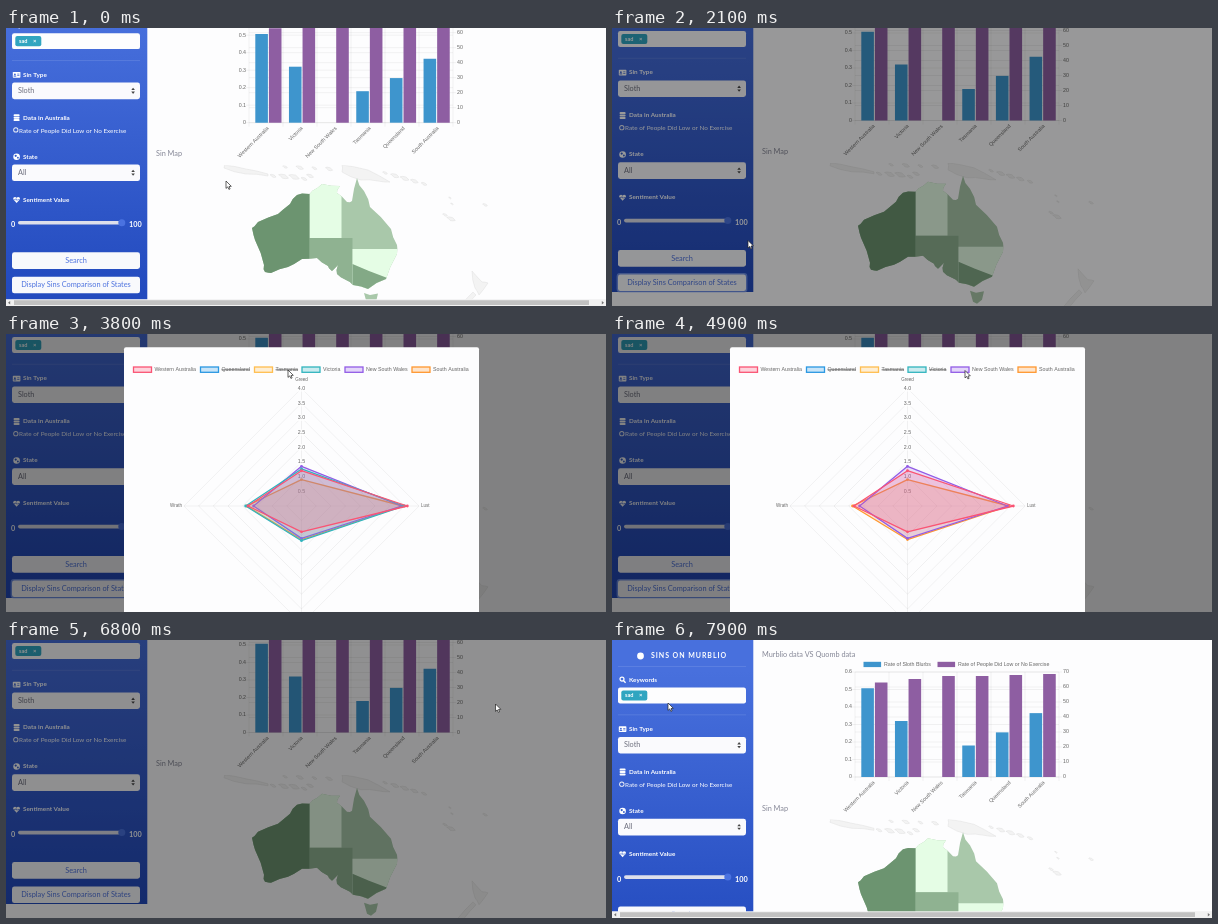
Write an HTML page with a canvas that moves like this. It is 600x278 px and loops after 8 s.

```html
<!DOCTYPE html>
<html lang="en">
<head>
<meta charset="utf-8">
<title>Sins dashboard</title>
<style>
html, body { margin: 0; width: 100%; height: 100%; overflow: hidden; background: #fdfdfe; }
canvas { display: block; width: 600px; height: 278px; }
</style>
</head>
<body>
<canvas id="stage"></canvas>
<script>
const W = 600, H = 278, LOOP = 8000, STEP = 100;
const canvas = document.getElementById('stage');
const dpr = window.devicePixelRatio || 1;
canvas.width = W * dpr;
canvas.height = H * dpr;
const c = canvas.getContext('2d');

const UI = 'Lato, "Open Sans", sans-serif';
const CHART = '"Liberation Sans", Arial, sans-serif';
const GRID = 'rgba(0,0,0,.1)';

const SCROLL = [[0, 42.3], [200, 44.5], [7350, 44.5], [7750, 0]];
const SHADE = [[1800, 0], [2100, 0.4], [2300, 0.49], [6600, 0.49], [6800, 0.43], [7000, 0]];
const POINTER = [
  [0, 220, 153], [900, 160, 220], [1500, 104, 254], [1850, 102, 255], [2100, 136, 212.5],
  [2700, 288, 158.5], [3000, 232, 36], [3800, 282, 36], [4400, 326, 36], [4800, 353, 36.5],
  [5200, 353, 36.5], [6100, 488.5, 48.5], [6800, 489.5, 64], [7100, 480, 66], [7900, 56, 63]
];

const clamp = x => Math.max(0, Math.min(1, x));
const ramp = (t, a, b) => clamp((t - a) / (b - a));
const smooth = x => x * x * (3 - 2 * x);

function track(keys, t, col = 1) {
  if (t <= keys[0][0]) return keys[0][col];
  for (let i = 1; i < keys.length; i++) {
    const a = keys[i - 1], b = keys[i];
    if (t <= b[0]) return a[col] + (b[col] - a[col]) * smooth(ramp(t, a[0], b[0]));
  }
  return keys[keys.length - 1][col];
}

function seeded(s) {
  return () => (s = (s * 16807) % 2147483647) / 2147483647;
}

function rect(x, y, w, h, fill, r = 0) {
  c.fillStyle = fill;
  c.beginPath();
  c.roundRect(x, y, w, h, r);
  c.fill();
}

function line(x1, y1, x2, y2, color, w = 0.5) {
  c.strokeStyle = color;
  c.lineWidth = w;
  c.beginPath();
  c.moveTo(x1, y1);
  c.lineTo(x2, y2);
  c.stroke();
}

function dot(x, y, r, fill) {
  c.fillStyle = fill;
  c.beginPath();
  c.arc(x, y, r, 0, 7);
  c.fill();
}

function text(s, x, y, size, color, { font = UI, weight = 400, align = 'left', space = 0 } = {}) {
  c.font = `${weight} ${size}px ${font}`;
  c.letterSpacing = space + 'px';
  c.textAlign = align;
  c.textBaseline = 'middle';
  c.fillStyle = color;
  c.fillText(s, x, y);
  const w = c.measureText(s).width;
  c.letterSpacing = '0px';
  return w;
}

const label = (s, x, y, align = 'left', size = 5.27) => text(s, x, y, size, '#666', { font: CHART, align });

function trace(pts) {
  c.beginPath();
  for (let i = 0; i < pts.length; i += 2) c.lineTo(pts[i], pts[i + 1]);
  c.closePath();
}

function shape(pts, fill, stroke, w = 0.5) {
  trace(pts);
  if (fill) { c.fillStyle = fill; c.fill(); }
  if (stroke) { c.strokeStyle = stroke; c.lineWidth = w; c.stroke(); }
}

/* sidebar */
const ICONS = {
  search(x, y) {
    c.strokeStyle = '#fff';
    c.lineWidth = 1.2;
    c.beginPath();
    c.arc(x - 0.6, y - 0.6, 2, 0, 7);
    c.stroke();
    line(x + 1, y + 1, x + 3, y + 3, '#fff', 1.3);
  },
  card(x, y) {
    rect(x - 3.8, y - 2.8, 7.6, 5.8, '#fff', 0.7);
    dot(x - 1.7, y - 0.3, 0.9, '#3c64d2');
    rect(x - 3, y + 0.9, 2.6, 1, '#3c64d2');
    for (const d of [-1, 0.6]) rect(x + 0.6, y + d, 2.2, 0.7, '#3c64d2');
  },
  data(x, y) {
    for (const d of [-2.4, 0, 2.4]) rect(x - 3, y + d - 1, 6, 2, '#fff', 0.9);
  },
  globe(x, y) {
    dot(x, y, 3.3, '#fff');
    dot(x - 0.9, y - 0.9, 1.1, '#3059c8');
    dot(x + 1.3, y + 1, 0.9, '#3059c8');
  },
  heart(x, y) {
    for (const d of [-1.6, 1.6]) dot(x + d, y - 1, 1.8, '#fff');
    shape([x - 3.3, y - 0.4, x + 3.3, y - 0.4, x, y + 3.3], '#fff');
    line(x - 3.4, y, x - 0.8, y, '#2b54c4', 0.6);
    line(x - 0.8, y - 1.2, x + 0.6, y + 1.2, '#2b54c4', 0.6);
    line(x + 0.8, y, x + 3.4, y, '#2b54c4', 0.6);
  }
};

function heading(icon, s, y) {
  ICONS[icon](10.6, y);
  text(s, 17, y, 6.35, '#fff', { weight: 700 });
}

function select(s, y) {
  rect(6, y, 128, 16.6, '#fafafd', 2.4);
  text(s, 12, y + 8.2, 7.3, '#6e707e');
  for (const d of [-1, 1]) {
    const m = y + 8.25 + d * 0.75;
    shape([125.3, m, 128.9, m, 127.1, m + d * 2.3], '#444');
  }
}

function button(s, y, focus) {
  if (focus) rect(4.6, y - 1.4, 130.8, 19.4, 'rgba(150,178,250,.65)', 3.4);
  rect(6, y, 128, 16.6, '#f8f9fc', 2.4);
  text(s, 70, y + 8.3, 7.37, '#4e73df', { align: 'center' });
}

function sidebar(t) {
  const g = c.createLinearGradient(0, 0, 0, 308.5);
  g.addColorStop(0.1, '#4870dd');
  g.addColorStop(1, '#224abe');
  rect(0, 0, 141.3, t < 100 ? 314 : 308.5, g);

  dot(28.5, 16, 3.4, '#fff');
  text('SINS ON MURBLIO', 39, 16, 7, '#fff', { weight: 700, space: 0.95 });
  for (const y of [26.5, 74.8]) line(6, y, 134, y, 'rgba(255,255,255,.18)', 0.6);

  heading('search', 'Keywords', 39.7);
  rect(6, 47.6, 128, 15.8, '#fdfdfe', 2.2);
  rect(9.3, 50.4, 26, 10.2, '#30a5c0', 2);
  text('sad', 13, 55.4, 5.6, '#fff', { weight: 700 });
  text('×', 27, 55.3, 6, '#fff', { weight: 700 });

  heading('card', 'Sin Type', 89);
  select('Sloth', 96.9);
  heading('data', 'Data in Australia', 132);
  dot(9.8, 144.2, 2.6, '#eef0f6');
  dot(9.8, 144.2, 1.7, '#3b62ce');
  text('Rate of People Did Low or No Exercise', 13, 145, 6.35, '#fff');
  heading('globe', 'State', 171);
  select('All', 178.8);
  heading('heart', 'Sentiment Value', 214);

  text('0', 5, 239.3, 7.3, '#fff', { weight: 700 });
  rect(12, 235.3, 105.5, 3.6, '#dddfeb', 1.8);
  dot(115.8, 237.1, 3.5, '#4a72e0');
  text('100', 123, 239.3, 7.3, '#fff', { weight: 700 });

  button('Search', 266.6, false);
  button('Display Sins Comparison of States', 291, t >= 1800 && t < 6500);
}

/* bar chart: state, sloth rate, low exercise rate */
const RATES = [
  ['Western Australia', 0.507, 63], ['Victoria', 0.32, 65.3], ['New South Wales', 0, 67.3],
  ['Tasmania', 0.18, 67.3], ['Queensland', 0.255, 68], ['South Australia', 0.365, 68.7]
];

function bars() {
  const L = 243, R = 447, top = 32, base = 137, h = base - top, step = (R - L) / 6;
  text('Murblio data VS Quomb data', 150, 14.7, 7.3, '#858796');
  rect(251.5, 21.8, 17.6, 5.3, '#3e95cd');
  label('Rate of Sloth Blurbs', 272, 24.6);
  rect(325.5, 21.8, 17.6, 5.3, '#8e5ea2');
  label('Rate of People Did Low or No Exercise', 346, 24.6);

  for (let i = 0; i <= 6; i++) {
    const y = base - h * i / 6, x = L + step * i;
    line(L - 3, y, R, y, GRID);
    line(x, top, x, base + 4, GRID);
    label(i ? (i / 10).toFixed(1) : '0', L - 3, y, 'right');
  }
  for (let i = 0; i <= 7; i++) {
    const y = base - h * i / 7;
    line(L, y, R + 3, y, GRID);
    label(String(i * 10), R + 4, y);
  }
  RATES.forEach(([name, sloth, lazy], i) => {
    const x = 249.3 + i * 33.65, a = h * sloth / 0.6, b = h * lazy / 70;
    rect(x, base - a, 12.6, a, '#3e95cd');
    rect(x + 13.6, base - b, 12.6, b, '#8e5ea2');
    c.save();
    c.translate(L + step * (i + 0.5) + 2, base + 5);
    c.rotate(-Math.PI / 4);
    label(name, 0, 0, 'right');
    c.restore();
  });
}

/* map */
const COAST = [
  303.5, 166, 291, 167, 284, 176, 272, 186, 252, 194, 246, 200, 249, 212, 258, 237, 259, 244, 265, 245,
  282, 239, 296, 231, 311, 230, 322, 238, 326, 243, 332, 237, 331, 246, 340, 252, 347, 257, 362, 261,
  380, 251, 391, 226, 391, 217, 385, 201, 364, 179, 358, 163, 351, 150, 346, 173, 341, 174,
  331, 165, 334, 158, 316, 156, 306, 163
];

// Splits every edge and nudges the middle, for a ragged shore
function ragged(pts, amp, seed) {
  const rnd = seeded(seed), out = [], n = pts.length;
  for (let i = 0; i < n; i += 2) {
    const x = pts[i], y = pts[i + 1], u = pts[(i + 2) % n], v = pts[(i + 3) % n];
    out.push(x, y, (x + u) / 2 + (rnd() - 0.5) * amp, (y + v) / 2 + (rnd() - 0.5) * amp);
  }
  return out;
}
const SHORE = ragged(COAST, 2.4, 77);

const isle = pts => shape(ragged(pts, 1.5, 31), '#f3f3f3', '#dedede');

// A row of small islands from one point to another
function chain(x1, y1, x2, y2, n, size, seed) {
  const rnd = seeded(seed);
  for (let i = 0; i < n; i++) {
    const k = n > 1 ? i / (n - 1) : 0, x = x1 + (x2 - x1) * k, y = y1 + (y2 - y1) * k;
    const w = size * (0.6 + rnd() * 0.6), d = w * 0.35;
    isle([x - w, y - d, x + w * 0.3, y - d, x + w, y + d, x - w * 0.2, y + d]);
  }
}

function australia() {
  c.save();
  trace(SHORE);
  c.clip();
  rect(240, 145, 160, 120, '#a9c8aa');
  rect(303.5, 145, 32, 65, '#e5fde5');
  rect(303.5, 210, 43, 55, '#8fb291');
  rect(240, 145, 63.5, 120, '#6c9470');
  rect(346.5, 221, 50, 45, '#e5fde5');
  shape([346.5, 236, 363, 243, 384, 251, 384, 266, 346.5, 266], '#83a986');
  c.restore();
}

function map() {
  text('Sin Map', 150, 168.5, 7.3, '#858796');
  c.save();
  c.beginPath();
  c.rect(217, 179.5, 270, 160);
  c.clip();
  c.translate(0, 42.3);
  isle([218, 137, 240, 141, 262, 146, 262, 148, 240, 146, 218, 140]);
  isle([336, 137, 362, 142, 384, 154, 372, 153, 355, 152, 336, 144]);
  chain(267, 148, 288, 149, 3, 5, 5);
  chain(298, 151, 304, 148, 2, 5, 9);
  chain(279, 139, 323, 141, 4, 4, 12);
  chain(379, 145, 418, 156, 5, 4, 21);
  chain(444, 170, 446, 176, 2, 2, 8);
  chain(439, 187, 445, 191, 2, 4, 6);
  chain(479, 177, 479, 177, 1, 4, 4);
  isle([466, 243, 476, 254, 482, 255, 473, 267, 469, 260]);
  isle([467, 264, 470, 267, 457, 282, 449, 284]);
  australia();
  shape([358, 265, 364, 267, 372, 265.5, 370, 274, 365, 278, 361, 276], '#a9c8aa');
  c.restore();
}

function scrollbar() {
  rect(0, 271.3, W, 6.7, '#f1f1f1');
  rect(8, 272.2, 575, 4.9, '#c1c1c1');
  shape([2, 274.7, 4.2, 273, 4.2, 276.4], '#777');
  shape([598, 274.7, 595.8, 273, 595.8, 276.4], '#777');
}

/* radar dialog */
const series = (name, x, rgb, off, ...v) => ({ name, x, rgb, off, v });
const SERIES = [
  series('Western Australia', 127.5, '250,84,116', Infinity, 1.2, 3.6, 0.88, 1.82),
  series('Queensland', 194.5, '42,152,226', 3100, 1.34, 3.62, 1.02, 2.1),
  series('Tasmania', 248.5, '255,190,80', 3800, 0.9, 3.55, 1.65, 1.64),
  series('Victoria', 296, '50,180,190', 4400, 1.26, 3.5, 1.18, 1.9),
  series('New South Wales', 339, '146,92,230', 5000, 1.35, 3.4, 1.1, 1.63),
  series('South Australia', 406, '255,152,48', Infinity, 0.9, 3.45, 1.14, 1.87)
];

function radar(t) {
  const X = 295.5, Y = 172, unit = 29.4, reach = 4 * unit;
  const diamond = v => [X, Y - v[0] * unit, X + v[1] * unit, Y, X, Y + v[2] * unit, X - v[3] * unit, Y];

  for (const s of SERIES) {
    c.fillStyle = `rgba(${s.rgb},.25)`;
    c.strokeStyle = `rgb(${s.rgb})`;
    c.lineWidth = 1.3;
    c.fillRect(s.x, 33, 18, 5.3);
    c.strokeRect(s.x, 33, 18, 5.3);
    const x = s.x + 21, w = label(s.name, x, 35.8);
    if (t >= s.off) line(x, 35.8, x + w, 35.8, '#666', 0.8);
  }

  for (let r = 0.5; r <= 4; r += 0.5) shape(diamond([r, r, r, r]), null, GRID);
  line(X - reach, Y, X + reach, Y, GRID);
  line(X, Y - reach, X, Y + reach, GRID);
  label('Greed', X, 46.2, 'center', 4.5);
  label('Lust', 415, Y, 'left', 4.5);
  label('Wrath', 176, Y, 'right', 4.5);
  for (let r = 0.5; r <= 4; r += 0.5) {
    const y = Y - r * unit;
    rect(X - 4.8, y - 3.2, 9.6, 6.4, 'rgba(255,255,255,.75)');
    label(r.toFixed(1), X, y, 'center');
  }

  const grow = 1 - Math.pow(1 - ramp(t, 2200, 2700), 4);
  c.lineJoin = 'round';
  for (const s of [...SERIES].reverse()) {
    if (t >= s.off) continue;
    const p = diamond(s.v.map(v => v * grow));
    shape(p, `rgba(${s.rgb},.2)`, `rgb(${s.rgb})`, 1.3);
    for (let i = 0; i < p.length; i += 2) dot(p[i], p[i + 1], 1.4, `rgb(${s.rgb})`);
  }
  c.lineJoin = 'miter';
}

function dialog(t) {
  const show = ramp(t, 2100, 2300) * (1 - ramp(t, 6350, 6600));
  if (!show) return;
  const slide = smooth(ramp(t, 2100, 2400)) * (1 - ramp(t, 6350, 6650));
  c.save();
  c.globalAlpha = show;
  c.translate(0, -22 * (1 - slide));
  rect(118, 13.2, 355, 330, '#fdfdfe', 2);
  radar(t);
  c.restore();
}

function pointer(t) {
  c.save();
  c.translate(track(POINTER, t, 1), track(POINTER, t, 2));
  shape([0, 0, 0, 7.4, 1.7, 5.9, 2.9, 8.4, 4.1, 7.9, 3, 5.5, 5.3, 5.3], '#fff', '#222', 0.7);
  c.restore();
}

function draw(t) {
  c.setTransform(dpr, 0, 0, dpr, 0, 0);
  rect(0, 0, W, H, '#fdfdfe');
  c.save();
  c.translate(0, -track(SCROLL, t));
  bars();
  map();
  sidebar(t);
  c.restore();
  if (t < 1900 || t >= 7000) scrollbar();
  const shade = track(SHADE, t);
  if (shade) rect(0, 0, W, H, `rgba(0,0,0,${shade})`);
  dialog(t);
  pointer(t);
}

const start = performance.now();
function frame() {
  const t = (performance.now() - start) % LOOP;
  draw(Math.floor(t / STEP) * STEP);
  requestAnimationFrame(frame);
}
frame();
</script>
</body>
</html>
```
